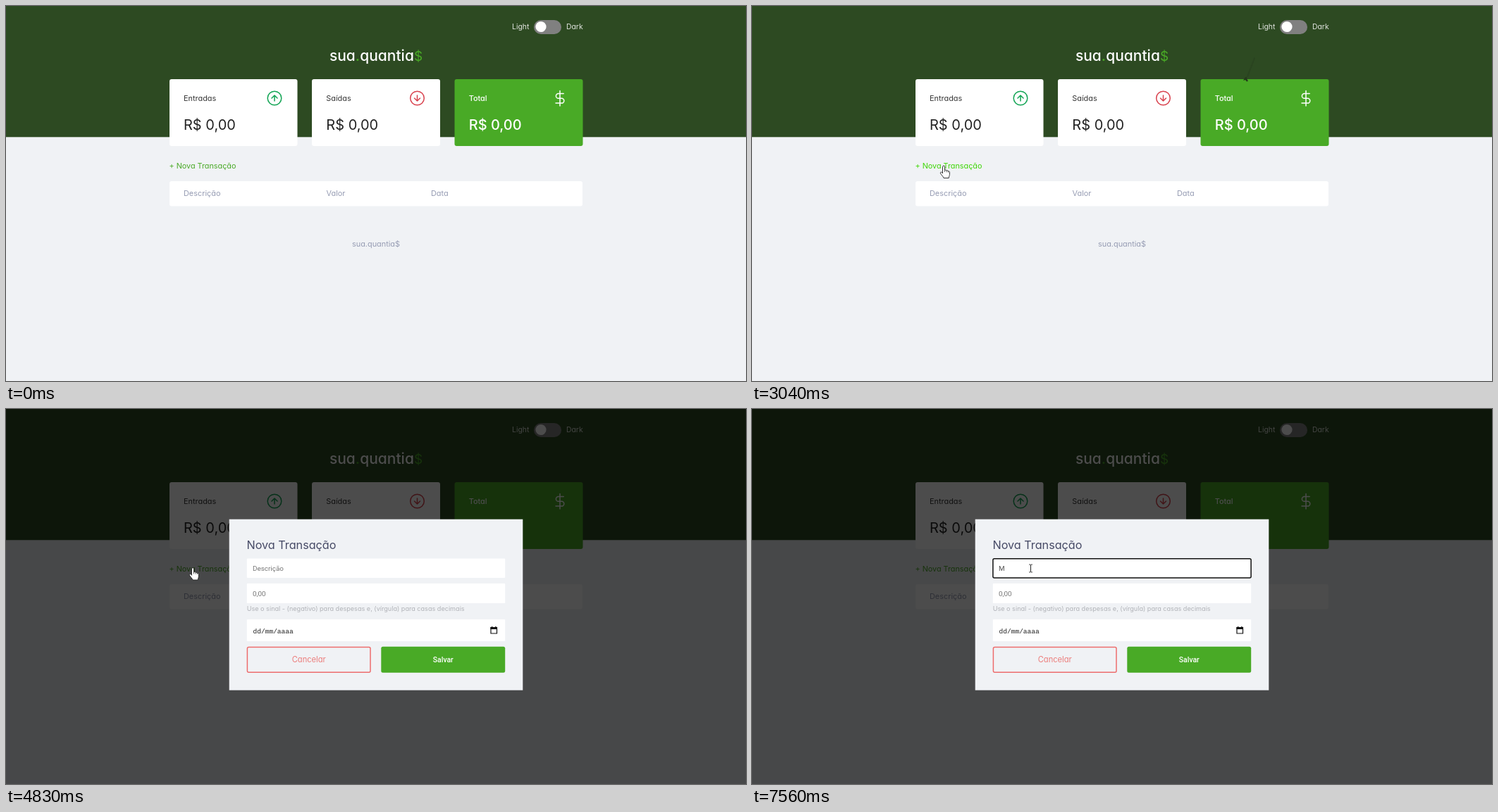
These frames come from a looping animation (1050 px wide and 533 px high, 8000 ms). An HTML page:

```html
<!DOCTYPE html>
<html lang="pt-BR">
<head>
<meta charset="utf-8">
<title>sua.quantia$</title>
<style>
  html, body { margin: 0; width: 100%; height: 100%; overflow: hidden; background: #f0f2f5; }
  svg { display: block; width: 100vw; height: 100vh; }
  text { font: 10.9px Inter, "Open Sans", sans-serif; font-feature-settings: "cv11"; white-space: pre; }
  .toggle { font-size: 10.4px; fill: #e3e6e1; }
  .logo { font-size: 21px; font-weight: 500; fill: #fff; }
  .label { fill: #363636; }
  .amount { font-size: 20px; fill: #222; }
  .total text { fill: #fff; font-weight: 500; }
  .link { font-size: 10.8px; fill: #49aa26; }
  .link.hover { fill: #3dd705; }
  .muted { fill: #969cb3; }
  .title { font-size: 16.2px; fill: #464a66; }
  .field { font: 9.9px Roboto, "Liberation Sans", sans-serif; fill: #757575; }
  .typed { fill: #555; }
  .hint { font-size: 9.1px; fill: #b1b3b8; }
  .date { font: 9.55px "Liberation Mono", "Noto Sans Mono", monospace; fill: #222; }
  .cancel { font-size: 11.1px; fill: #ec7c7a; }
  .save { font: 500 10.4px Roboto, "Liberation Sans", sans-serif; fill: #fff; }
  .option { font: 600 9.2px "Open Sans", "Noto Sans", sans-serif; fill: #fff; }
  .stroke { fill: none; stroke-width: 1.5; stroke-linecap: round; stroke-linejoin: round; }
  #click { mix-blend-mode: multiply; }
</style>
</head>
<body>
<svg viewBox="0 0 1050 533" preserveAspectRatio="none">
  <rect width="1050" height="533" fill="#f0f2f5"/>
  <rect width="1050" height="186.3" fill="#2d4a22"/>

  <text class="toggle" x="718" y="33">Light</text>
  <rect x="749" y="20" width="39" height="20" rx="10" fill="#808080"/>
  <circle cx="759" cy="29.5" r="7.6" fill="#fff"/>
  <text class="toggle" x="795" y="33">Dark</text>

  <text class="logo" x="525" y="78" text-anchor="middle">sua<tspan fill="#49aa26">.</tspan>quantia<tspan fill="#49aa26" font-weight="400" font-size="19">$</tspan></text>

  <g>
    <rect x="232" y="104" width="181.5" height="95" rx="3" fill="#fff"/>
    <text class="label" x="252" y="135">Entradas</text>
    <text class="amount" x="252" y="175.5">R$ 0,00</text>
    <g class="stroke" stroke="#12a454" transform="translate(381 131)">
      <circle r="9.8"/><path d="M0 4V-4M-4 0L0-4 4 0"/>
    </g>
  </g>
  <g>
    <rect x="434" y="104" width="182" height="95" rx="3" fill="#fff"/>
    <text class="label" x="454.3" y="135">Saídas</text>
    <text class="amount" x="454.3" y="175.5">R$ 0,00</text>
    <g class="stroke" stroke="#d9434f" transform="translate(583.5 131)">
      <circle r="9.8"/><path d="M0-4V4M-4 0L0 4 4 0"/>
    </g>
  </g>
  <g class="total">
    <rect x="636.5" y="104" width="182" height="95" rx="3" fill="#49aa26"/>
    <text x="656.7" y="135">Total</text>
    <text class="amount" x="656.7" y="175.5">R$ 0,00</text>
    <path class="stroke" stroke="#fff" transform="translate(786 131)"
      d="M0-10.5V11M5.2-6.5H-2.2A3.4 3.4 0 0 0-2.2 .3H2.4A3.4 3.4 0 0 1 2.4 7.1H-6"/>
  </g>
  <g id="trail" fill="#24391c">
    <path d="M697 106L699.5 101.5 702 101 702.5 104 704 106.5 702 107.5 700 105Z"/>
    <path id="streak" d="M712.5 73L714 74 704 101 701.5 101Z" opacity=".35"/>
  </g>

  <text class="link" id="link" x="231.5" y="231">+ Nova Transação</text>
  <rect x="232" y="249" width="586" height="35.5" rx="3" fill="#fff"/>
  <text class="muted" x="252" y="270">Descrição</text>
  <text class="muted" x="454.5" y="270">Valor</text>
  <text class="muted" x="603" y="270">Data</text>
  <text class="muted" x="525" y="342" text-anchor="middle">sua.quantia$</text>

  <g id="modal">
    <rect width="1050" height="533" opacity=".7"/>
    <rect x="316.7" y="156.7" width="416.6" height="243" fill="#f0f2f5"/>
    <text class="title" x="341.5" y="199">Nova Transação</text>
    <g fill="#fff">
      <rect x="341.8" y="212.4" width="366.4" height="27.6" rx="1"/>
      <rect x="341.8" y="248" width="366.4" height="28" rx="1"/>
      <rect x="341.8" y="299" width="366.4" height="31" rx="1"/>
    </g>
    <rect id="focus" x="341.9" y="212.7" width="366.2" height="27.2" rx="2" fill="#fff" stroke="#101010" stroke-width="1.5"/>
    <text class="field" id="empty" x="350" y="229.8">Descrição</text>
    <text class="field typed" id="typed" x="350" y="229.8">M</text>
    <text class="field" x="350" y="265.7">0,00</text>
    <text class="hint" x="341.7" y="287">Use o sinal - (negativo) para despesas e, (vírgula) para casas decimais</text>
    <text class="date" x="350.5" y="318.5">dd/mm/aaaa</text>
    <path d="M688 310.5H696.5V319H688Z" fill="none" stroke="#111" stroke-width="1.2"/>
    <path d="M687.5 310H697V313H687.5ZM689 309H690.3V311H689ZM694.2 309H695.5V311H694.2Z" fill="#111"/>
    <rect x="342.4" y="338.6" width="174.6" height="35.6" rx="2" fill="none" stroke="#ed6d6d" stroke-width="1.5"/>
    <text class="cancel" x="429.7" y="360.3" text-anchor="middle">Cancelar</text>
    <rect x="532.3" y="337.8" width="175.9" height="37" rx="2.5" fill="#49aa26"/>
    <text class="save" x="620.3" y="360" text-anchor="middle">Salvar</text>
    <g id="menu">
      <rect x="341" y="242" width="142" height="65.5" rx="2" opacity=".25"/>
      <rect x="341.5" y="241" width="141" height="65" rx="2" fill="#29292c"/>
      <text class="option" x="349" y="264">Computador</text>
      <text class="option" x="349" y="290">a</text>
    </g>
    <rect id="caret" y="221" width="1" height="11" fill="#111"/>
  </g>

  <circle id="click" cx="394" cy="226" r="8.2" fill="#faee50"/>
  <g id="pointer" stroke-linejoin="round">
    <path id="arrow" d="M0 0V12L2.8 9.5 4.6 13.8 6.6 13 4.8 8.7H8.5Z" fill="#fff" stroke="#222" stroke-width=".8"/>
    <g id="hand">
      <path d="M-1.5 10V1.6A1.5 1.5 0 0 1 1.5 1.6V6.5C2.5 5.8 4 6 4.2 7 5.3 6.5 6.4 7 6.6 8 7.6 7.7 8.4 8.2 8.4 9.3V12.5C8.4 14 7.4 15 7.2 17.5H0C-.5 15.5-3.5 13-4.6 10.8-5 9.4-3.5 8.4-2.6 9.4L-1.5 10.8Z" fill="#fff" stroke="#222" stroke-width=".9"/>
      <path d="M1.5 6.5V9M4.2 7V9.3M6.6 8V9.6" fill="none" stroke="#222" stroke-width=".7"/>
    </g>
    <path id="beam" d="M-2.3-5.2H-.7L0-4.6 .7-5.2H2.3M0-4.6V5M-2.3 5.6H-.7L0 5 .7 5.6H2.3" fill="none" stroke="#222"/>
  </g>
</svg>
<script>
const LOOP = 8000;
const STEP = 77;
const start = performance.now();
const el = Object.fromEntries([...document.querySelectorAll('[id]')].map(n => [n.id, n]));

// Each run: start time, pointer shape, then one position per step.
const runs = [
  [810, 'arrow', [752, 522], [744, 478], [717, 427], [676, 372], [628, 320], [575, 274],
    [520, 235], [468, 203], [425, 177], [392, 160], [371, 153], [355, 152]],
  [1810, 'arrow', [358, 152], [385, 150], [450, 145], [540, 134], [628, 116], [694, 93],
    [708, 69], [704, 79], [665, 114], [582, 162], [491, 200]],
  [2650, 'arrow', [424, 213], [368, 222], [329, 226]],
  [2880, 'hand', [302, 228], [284, 228], [272, 227], [265, 226], [261, 225], [258, 224],
    [257, 223], [256, 223], [258, 224], [261, 225], [265, 225.5]],
  [5160, 'arrow', [245, 226], [284, 227]],
  [5310, 'beam', [346, 226.3], [395.5, 226.3]]
];
const path = runs.flatMap(([t, kind, ...pts]) =>
  pts.map(([x, y], i) => ({ t: t + i * STEP - 3, kind, x, y })));

const show = (node, on) => node.setAttribute('visibility', on ? 'inherit' : 'hidden');
const within = (t, a, b = LOOP) => t >= a && t < b;

function draw(t) {
  const p = path.findLast(s => s.t <= t);
  show(el.pointer, p);
  for (const kind of ['arrow', 'hand', 'beam']) show(el[kind], p && p.kind === kind);
  if (p) el.pointer.setAttribute('transform', `translate(${p.x} ${p.y})`);

  const open = within(t, 4825);
  const typed = within(t, 7025);
  el.link.classList.toggle('hover', !open && !!p && p.kind === 'hand');
  show(el.trail, within(t, 2265, 4825));
  show(el.streak, within(t, 2425, 4825));
  show(el.modal, open);
  show(el.focus, within(t, 5765));
  show(el.menu, within(t, 5765, 7025));
  show(el.click, within(t, 5765, 5845));
  show(el.empty, open && !typed);
  show(el.typed, typed);
  show(el.caret, within(t, 5765, 6225) || within(t, 6795, 7555));
  el.caret.setAttribute('x', typed ? 358 : 350);
}

function tick() {
  draw((performance.now() - start) % LOOP);
  requestAnimationFrame(tick);
}
tick();
</script>
</body>
</html>
```
